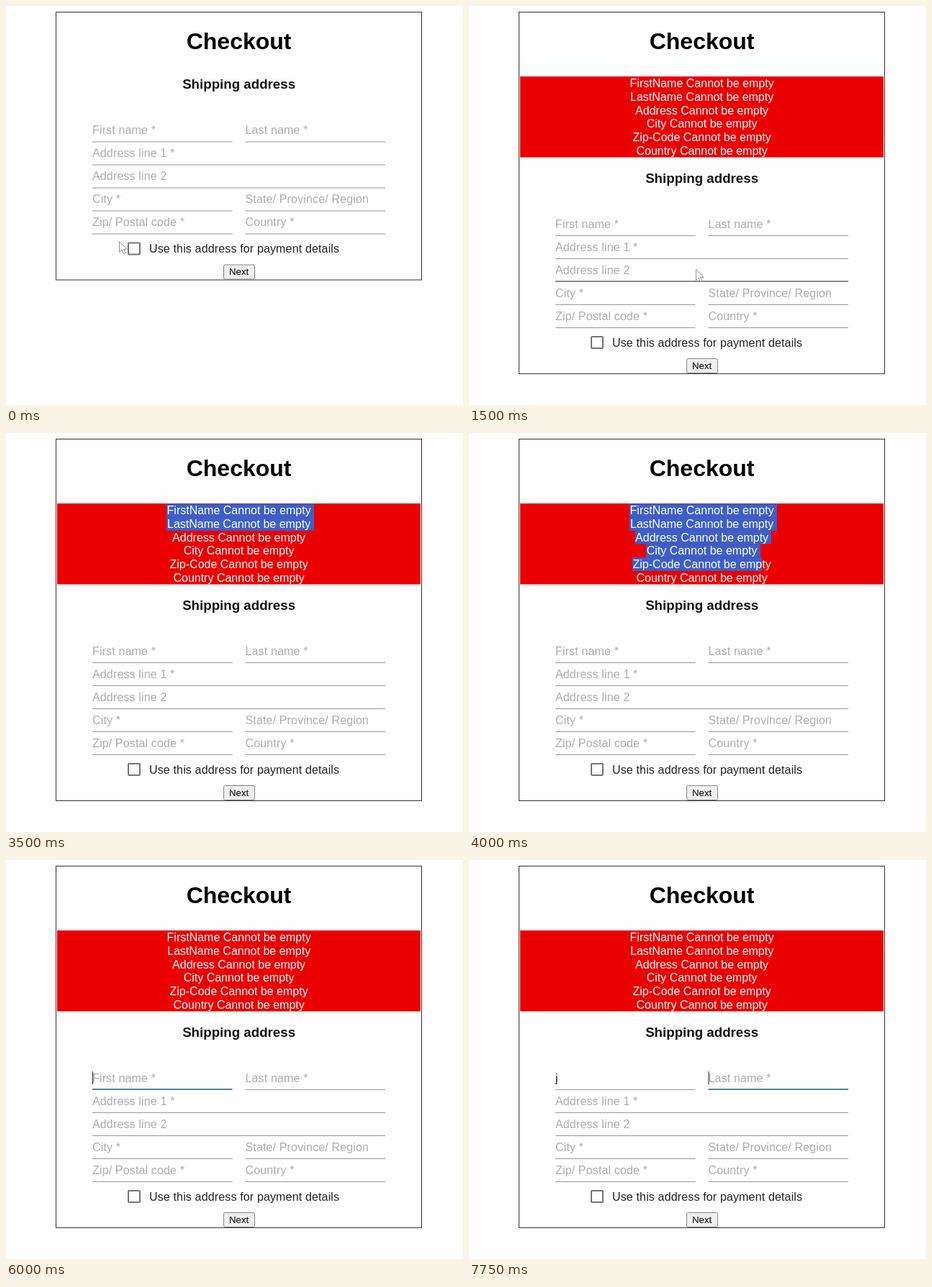
Animation of 635x555 px, one loop 8000 ms. Source, as an HTML page:

```html
<!DOCTYPE html>
<html lang="en">
<head>
<meta charset="utf-8">
<title>Checkout form</title>
<style>
  html, body { margin: 0; width: 100%; height: 100%; overflow: hidden; background: #fefefe; }
  svg { display: block; font: 16px "Liberation Sans", Arial, sans-serif; }
  .mid { text-anchor: middle; }
  .bold { font-weight: bold; }
  .field { letter-spacing: .15px; fill: #adadad; }
</style>
</head>
<body>
<svg id="stage" width="635" height="555" viewBox="0 0 635 555"></svg>
<script>
const LOOP = 8000, CENTER = 323.6, ROW = 18.67, BANNER_TOP = 98, SHIFT = 130.5;
const LEFT = 120, RIGHT = 332.5, HALF = 194.5, FULL = 407;

const errors = ['FirstName', 'LastName', 'Address', 'City', 'Zip-Code', 'Country'];
const fields = [
  ['First name *', LEFT, 0, HALF], ['Last name *', RIGHT, 0, HALF],
  ['Address line 1 *', LEFT, 1, FULL], ['Address line 2', LEFT, 2, FULL],
  ['City *', LEFT, 3, HALF], ['State/ Province/ Region', RIGHT, 3, HALF],
  ['Zip/ Postal code *', LEFT, 4, HALF], ['Country *', RIGHT, 4, HALF],
];
// left and right edge of the full selection on each line
const selection = [[223, 428], [223, 428], [231, 420], [246, 405], [227, 407]];

// each entry changes only the named parts of the state
const steps = [
  [0, { mouse: [157, 327], hover: -1, focus: -1, selected: 0 }],
  [250, { mouse: [245, 352] }],
  [500, { mouse: [322, 366] }],
  [1000, { pressed: true }],
  [1500, { mouse: [315, 366], banner: true, pressed: false, hover: 3 }],
  [1750, { mouse: [296, 258], hover: -1 }],
  [2000, { mouse: null }],
  [3500, { selected: 2 }],
  [3750, { selected: 4 }],
  [4000, { selected: 5 }],
  [4500, { selected: 0 }],
  [4750, { mouse: [419, 201] }],
  [5000, { mouse: [352, 256] }],
  [5500, { mouse: [240, 274] }],
  [5750, { mouse: null, hover: 0 }],
  [6000, { hover: -1, focus: 0, caret: true }],
  [6500, { caret: false }],
  [7000, { typed: 'j', caret: true }],
  [7500, { caret: false }],
  [7750, { focus: 1, caret: true }],
];

const rect = (x, y, w, h, fill, more = '') =>
  `<rect x="${x}" y="${y}" width="${w}" height="${h}" fill="${fill}" ${more}/>`;
const text = (str, x, y, cls = '', more = '') =>
  `<text x="${x}" y="${y}" class="${cls}" ${more}>${str}</text>`;

function drawBanner(selected) {
  const marks = selection.slice(0, selected).map(([a, b], i) =>
    rect(a, BANNER_TOP + 0.5 + i * ROW, b - a, ROW, '#3c5fc9'));
  const lines = errors.map((name, i) =>
    text(name + ' Cannot be empty', CENTER, 113.4 + i * ROW, 'mid', 'fill="#fff"'));
  return rect(71, BANNER_TOP, 505, 112.5, '#ea0000') + marks.join('') + lines.join('');
}

function drawField([label, x, row, width], i, s) {
  const y = 319 + row * 32, typed = i === 0 && s.typed;
  const line = i === s.focus ? rect(x, y - 1, width, 2, '#4c82b0')
    : i === s.hover ? rect(x, y - 1, width, 2, '#8d8787')
    : rect(x, y, width, 1, '#989898');
  const caret = i === s.focus && s.caret
    ? rect(x + (typed ? 4 : 0), y - 25, 1, 18, '#222') : '';
  return line + text(typed || label, x, y - 10.2, 'field', typed ? 'style="fill:#222"' : '') + caret;
}

function drawMouse([x, y]) {
  return `<path transform="translate(${x} ${y})" fill="#fff" stroke="#909090"
    d="M.5.5V15.5L4 12.2L6.4 17.6L8.9 16.5L6.5 11.3H11Z"/>`;
}

function draw(s) {
  const dy = s.banner ? 0 : -SHIFT;
  return rect(69.5, 8.5, 508, 503 + dy, 'none', 'stroke="#333"') +
    text('Checkout', CENTER, 60, 'mid bold', 'font-size="32"') +
    (s.banner ? drawBanner(s.selected) : '') +
    `<g transform="translate(0 ${dy})">` +
    text('Shipping address', CENTER, 245.8, 'mid bold', 'font-size="18.72" fill="#111"') +
    fields.map((f, i) => drawField(f, i, s)).join('') +
    rect(170, 460, 16, 16, 'none', 'rx="1" stroke="#757575" stroke-width="2"') +
    text('Use this address for payment details', 199, 473.8, 'field', 'style="fill:#222"') +
    rect(302.5, 490.5, 43, 20, s.pressed ? '#e5e5e5' : '#efefef', 'rx="2" stroke="#858585"') +
    text('Next', CENTER, 504.5, 'mid', 'font-size="13.33"') +
    '</g>' + (s.mouse ? drawMouse(s.mouse) : '');
}

const stage = document.getElementById('stage');
let shown = -1;

function tick() {
  const t = performance.now() % LOOP;
  const past = steps.filter(([start]) => start <= t);
  if (past.length !== shown) {
    shown = past.length;
    stage.innerHTML = draw(Object.assign({}, ...past.map(([, change]) => change)));
  }
  requestAnimationFrame(tick);
}
tick();
</script>
</body>
</html>
```
